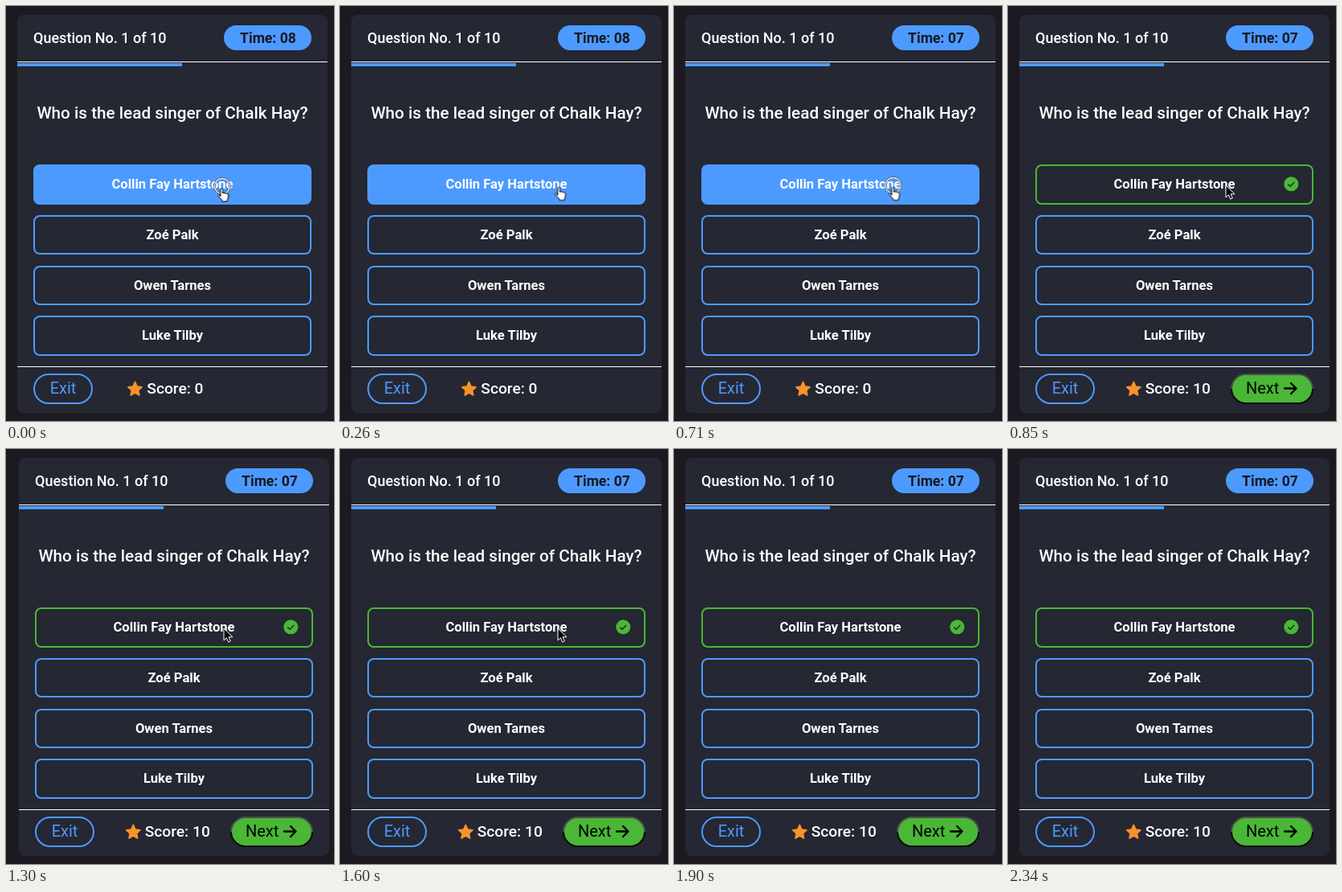
Animation of 408x516 px, one loop 3090 ms. Source, as an HTML page:

```html
<!DOCTYPE html>
<html lang="en">
<head>
<meta charset="utf-8">
<title>Quiz</title>
<style>
  html, body { margin: 0; width: 100%; height: 100%; overflow: hidden; background: #1c1920; }
  svg { display: block; width: 408px; height: 516px; }
  text { font-family: Roboto, Inter, sans-serif; font-weight: 500; fill: #fff; }
  .mid { text-anchor: middle; }
  .head { font-size: 18px; }
  .ask { font-size: 20.7px; }
  .time { font-size: 17.6px; font-weight: 700; fill: #171923; }
  .answer { font-size: 16.6px; font-weight: 600; }
  .score { font-size: 19.2px; }
  .button { font-size: 20px; font-weight: 400; }
  .box { fill: none; stroke: #4d9aff; stroke-width: 2; }

  /* Every change is a hard cut on one 3090 ms clock */
  .before, .after, .tick8, .tick7, .bar, .card, .hand, .ring, .arrow {
    animation: 3090ms step-end infinite;
  }
  .before { animation-name: before; }
  .after { animation-name: after; }
  .tick8 { animation-name: tick8; }
  .tick7 { animation-name: tick7; }
  .bar { animation-name: bar; }
  .card { animation-name: nudge; }
  .hand { animation-name: hand; }
  .ring { animation-name: ring; }
  .arrow { animation-name: arrow; }

  @keyframes before { 0% { visibility: visible } 27.508%, 100% { visibility: hidden } }
  @keyframes after { 0% { visibility: hidden } 27.508%, 100% { visibility: visible } }
  @keyframes tick8 { 0% { visibility: visible } 22.977%, 100% { visibility: hidden } }
  @keyframes tick7 { 0% { visibility: hidden } 22.977%, 100% { visibility: visible } }
  @keyframes bar { 0% { width: 205px } 22.977%, 100% { width: 180px } }
  @keyframes nudge {
    0% { transform: translate(0, 0) }
    32.362% { transform: translate(1px, 0) }
    42.071% { transform: translate(2px, 0) }
    51.780%, 100% { transform: translate(0, 0) }
  }
  @keyframes hand {
    0% { transform: translate(262.5px, 226px); visibility: visible }
    4.207% { transform: translate(264.5px, 225.5px); visibility: visible }
    8.414% { transform: translate(266.5px, 224.5px); visibility: visible }
    27.508%, 100% { transform: translate(266.5px, 224.5px); visibility: hidden }
  }
  @keyframes ring {
    0% { transform: translate(269px, 224px); visibility: visible }
    4.207% { transform: translate(272.5px, 223px); visibility: hidden }
    22.977% { transform: translate(272.5px, 223px); visibility: visible }
    27.508%, 100% { transform: translate(272.5px, 223px); visibility: hidden }
  }
  @keyframes arrow {
    0% { transform: translate(271px, 223px); visibility: hidden }
    27.508% { transform: translate(271px, 223px); visibility: visible }
    56.634% { transform: translate(292px, 235px); visibility: visible }
    61.489% { transform: translate(373px, 513px); visibility: hidden }
    70.874% { transform: translate(373px, 513px); visibility: visible }
    75.728%, 100% { transform: translate(373px, 513px); visibility: hidden }
  }
</style>
</head>
<body>
<svg viewBox="0 0 408 516">
  <defs>
    <linearGradient id="rim" x2="0" y2="1">
      <stop offset=".5" stop-color="#4c4c4c"/>
      <stop offset=".5" stop-color="#0c0c0c"/>
    </linearGradient>
    <path id="star" fill="#f7932a" stroke="#f7932a" stroke-width="1.6" stroke-linejoin="round"
      d="M0-8.6 2.6-3 8.6-2.2 4.2 2 5.3 8 0 5.1-5.3 8-4.2 2-8.6-2.2-2.6-3z"/>
  </defs>

  <g class="card">
    <rect x="14" y="11" width="386" height="495" rx="8" fill="#252733"/>

    <text class="head" x="34" y="46">Question No. 1 of 10</text>
    <rect x="271" y="24" width="109" height="31" rx="15.5" fill="#4d9aff"/>
    <text class="time mid tick8" x="326" y="46">Time: 08</text>
    <text class="time mid tick7" x="326" y="46">Time: 07</text>
    <rect x="14" y="69" width="386" height="1" fill="#fff"/>
    <rect class="bar" x="14" y="71" width="205" height="4" fill="#4d9aff"/>

    <text class="ask mid" x="207" y="140">Who is the lead singer of Chalk Hay?</text>

    <rect class="before" x="34" y="197" width="346" height="50" rx="8" fill="#4d9aff"/>
    <g class="after">
      <rect class="box" x="35" y="198" width="344" height="48" rx="7" style="stroke:#4ab736"/>
      <circle cx="352.3" cy="221.3" r="9" fill="#4ab736"/>
      <path d="M348.4 221.6l2.7 2.6 5-5.3" fill="none" stroke="#252733" stroke-width="1.5"/>
    </g>
    <rect class="box" x="35" y="261" width="344" height="47" rx="7"/>
    <rect class="box" x="35" y="324" width="344" height="47" rx="7"/>
    <rect class="box" x="35" y="386" width="344" height="48" rx="7"/>
    <text class="answer mid" x="207" y="227">Collin Fay Hartstone</text>
    <text class="answer mid" x="207" y="290">Zoé Palk</text>
    <text class="answer mid" x="207" y="353">Owen Tarnes</text>
    <text class="answer mid" x="207" y="415">Luke Tilby</text>

    <rect x="14" y="448" width="386" height="1" fill="#fff"/>
    <rect class="box" x="35" y="458" width="72" height="36" rx="18"/>
    <text class="button mid" x="71" y="482" style="fill:#4d9aff">Exit</text>

    <g class="before">
      <use href="#star" x="160.5" y="476"/>
      <text class="score" x="175.3" y="482">Score: 0</text>
    </g>
    <g class="after">
      <use href="#star" x="156.3" y="476"/>
      <text class="score" x="170.7" y="482">Score: 10</text>
      <rect x="278" y="458" width="101" height="36" rx="18" fill="#4ab736" stroke="url(#rim)" stroke-width="2"/>
      <text class="button" x="296" y="482" style="fill:#000">Next</text>
      <path d="M344 475.5H358M352 469l6.5 6.5-6.5 6.5" fill="none" stroke="#000"
        stroke-width="2.3" stroke-linecap="round" stroke-linejoin="round"/>
    </g>
  </g>

  <g class="ring" fill="none">
    <circle r="9.5" stroke="#333" stroke-width="2.4"/>
    <circle r="9.5" stroke="#fff" stroke-width="1.3"/>
  </g>
  <path class="hand" fill="#fff" stroke="#000" stroke-linejoin="round"
    d="M4.2 11V2.2a1.4 1.4 0 0 1 2.8 0V7a1.3 1.3 0 0 1 2.5.2 1.3 1.3 0 0 1 2.4.5 1.2 1.2 0 0 1 2.1.8V12l-1.2 3v2H6.2v-1.8l-5-5A1.3 1.3 0 0 1 3 8.6z"/>
  <path class="arrow" fill="#000" stroke="#fff" stroke-linejoin="round"
    d="M0 0V15L3.4 11.8 5.7 17 8.3 15.9 6 10.8H11z"/>
</svg>
</body>
</html>
```
